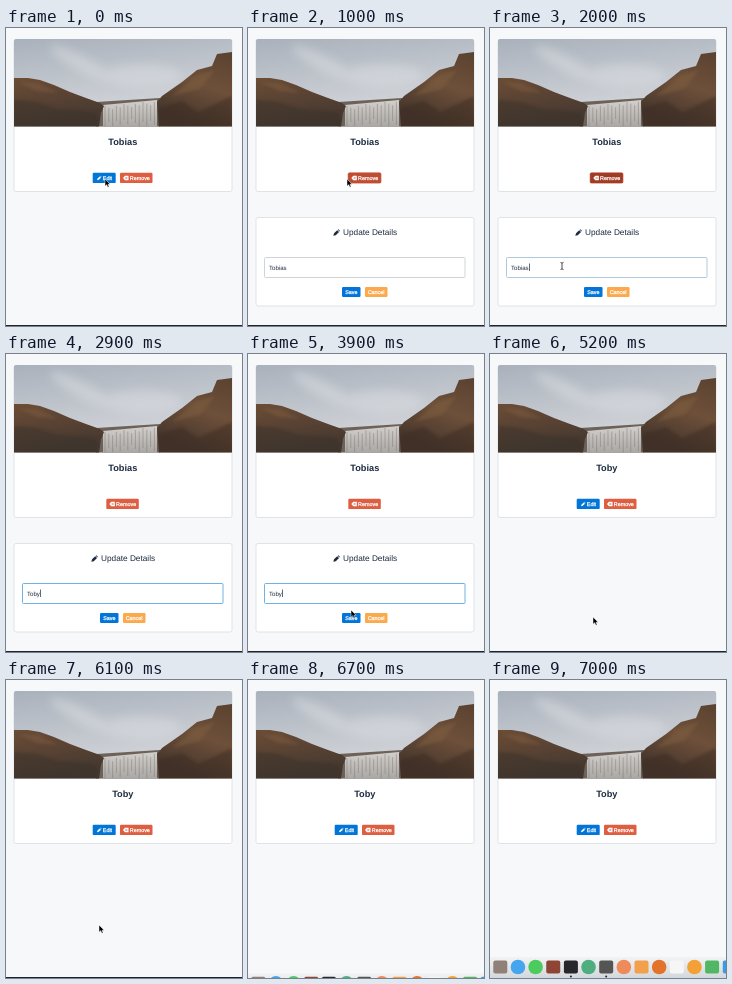
Write an HTML page that moves like this. It is 236 px wide and 298 px high and loops after 7.1 s.

```html
<!DOCTYPE html>
<html lang="en">
<head>
<meta charset="utf-8">
<title>Edit details</title>
<style>
  html, body { margin: 0; width: 100%; height: 100%; overflow: hidden; background: #f6f8fa; }
  svg { display: block; width: 100%; height: 100%; }
  text { font-family: "Liberation Sans", Arial, sans-serif; fill: #1c2b3f; text-rendering: geometricPrecision; }
  .label { font-size: 5.4px; fill: #fff; stroke: #fff; stroke-width: .25; }
  .card { fill: #fff; stroke: #dfe3e8; }
</style>
</head>
<body>
<svg viewBox="0 0 236 298">
  <defs>
    <linearGradient id="sky" x2=".3" y2="1">
      <stop stop-color="#a9b1bc"/><stop offset=".8" stop-color="#ced1d6"/>
    </linearGradient>
    <linearGradient id="left" x2=".3" y2="1">
      <stop stop-color="#6b4d36"/><stop offset=".5" stop-color="#584233"/><stop offset="1" stop-color="#443830"/>
    </linearGradient>
    <linearGradient id="right" x1="1" x2=".6" y2="1">
      <stop stop-color="#5a4230"/><stop offset=".5" stop-color="#6e503a"/><stop offset="1" stop-color="#46362c"/>
    </linearGradient>
    <linearGradient id="water" x2="0" y2="1">
      <stop stop-color="#d2d0cd"/><stop offset="1" stop-color="#a9a6a3"/>
    </linearGradient>
    <linearGradient id="shelf" x2="0" y2="1">
      <stop stop-color="#f1f3f5"/><stop offset="1" stop-color="#d3d6da"/>
    </linearGradient>
    <filter id="soft" x="-50%" y="-50%" width="200%" height="200%"><feGaussianBlur stdDeviation="5"/></filter>
    <filter id="blur"><feGaussianBlur stdDeviation="1.5"/></filter>
    <clipPath id="photo"><path d="M8 98.6V13q0-2 2-2H224q2 0 2 2V98.6z"/></clipPath>
    <path id="pencil" d="M0 6L.7 3.7 3.6.8 5.3 2.5 2.3 5.4zM4.1.4L4.7-.1 6.1 1.3 5.7 2z"/>
  </defs>

  <rect width="236" height="298" fill="#f6f8fa"/>
  <rect y="297" width="236" height="1" fill="#20242a"/>

  <rect class="card" x="8" y="11.5" width="218" height="152" rx="2"/>
  <g clip-path="url(#photo)">
    <rect x="8" y="11" width="218" height="88" fill="url(#sky)"/>
    <g fill="#dadde1" opacity=".5" filter="url(#soft)">
      <ellipse cx="76" cy="36" rx="36" ry="8" transform="rotate(28 76 36)"/>
      <ellipse cx="136" cy="48" rx="40" ry="12"/>
    </g>
    <path d="M90 99V74L154 70V99z" fill="#6d6259"/>
    <path d="M97 99V77L151 72V99z" fill="url(#water)"/>
    <path id="falls" fill="none" stroke="#7d736b" stroke-width="1" opacity=".45"/>
    <path d="M8 50L22 50 34 52 48 57 64 64 80 70 94 75 98 78 95 85 93 99H8z" fill="url(#left)"/>
    <path d="M226 24L211 26 206 38 191 42 176 54 156 68 151 74 153 99H226z" fill="url(#right)"/>
    <g filter="url(#blur)" opacity=".5">
      <path d="M8 72L30 74 52 81 90 84 92 99H8z" fill="#3a302a"/>
      <path d="M12 54L32 55 52 65 30 63z" fill="#7f5b3f"/>
      <path d="M153 80L176 73 192 84 226 68V99H153z" fill="#3a2c24"/>
      <path d="M166 68L191 47 209 42 194 61z" fill="#80603f"/>
    </g>
  </g>
  <text id="title" x="116.8" y="116.5" font-size="9.2" font-weight="700" text-anchor="middle"></text>

  <g id="edit">
    <rect x="86.7" y="144.7" width="23" height="10.4" rx="1.2" fill="#0275d8"/>
    <use href="#pencil" transform="translate(91 147.8) scale(.75)" fill="#fff"/>
    <text class="label" x="96.8" y="151.8">Edit</text>
  </g>
  <g id="remove">
    <rect id="ring" x="113.4" y="144.4" width="33.7" height="11.2" rx="1.8" fill="#c9735c"/>
    <rect id="removeBox" x="114" y="144.8" width="32.5" height="10.3" rx="1.2"/>
    <path d="M117 150L119 147.8H122.5V152.2H119z" fill="#fff"/>
    <path d="M119.3 149L121.3 151M121.3 149L119.3 151" stroke="#d9694e" stroke-width=".6"/>
    <text class="label" x="123.8" y="151.8">Remove</text>
  </g>

  <g id="panel">
    <rect class="card" x="8" y="189.5" width="218" height="88.5" rx="2"/>
    <use href="#pencil" transform="translate(85.3 201.3) scale(1.08)" fill="#1c2b3f"/>
    <text x="95" y="207.3" font-size="8.25">Update Details</text>
    <rect id="field" x="16.5" y="229.5" width="200.5" height="20" rx="1" fill="#fff"/>
    <text id="value" x="21" y="241.5" font-size="6.1"></text>
    <rect id="caret" y="235.5" width=".7" height="7.5" fill="#1c2b3f"/>
    <rect x="94" y="259" width="18.5" height="10" rx="1.2" fill="#0275d8"/>
    <text class="label" x="97.2" y="265.9">Save</text>
    <rect x="117" y="259" width="22.5" height="10" rx="1.2" fill="#fba94c"/>
    <text class="label" x="119.7" y="265.9">Cancel</text>
  </g>

  <g id="dock"><rect y="277" width="236" height="22" fill="url(#shelf)"/></g>

  <path id="arrow" d="M0 0V7.2L1.7 5.7 2.9 8.3 4.1 7.8 3 5.2H5.2z" stroke="#fff" stroke-width=".5"/>
  <path id="beam" d="M-1.5-3.5Q0-3.5 0-2.5Q0-3.5 1.5-3.5M0-2.5V2.5M-1.5 3.5Q0 3.5 0 2.5Q0 3.5 1.5 3.5" fill="none" stroke="#222" stroke-width=".8"/>
</svg>
<script>
const LOOP = 7100, STEP = 100;
const OPEN = 900, FOCUS = 2000, SAVE = 4500, DOCK = 6600;
const OLD = "Tobias", NEW = "Toby";
const edits = [[2400, "Tobia"], [2500, "Tobi"], [2600, "Tob"], [2800, NEW]];
const pointer = [[0, 99, 151], [1100, 99, 151], [1800, 72, 238], [3200, 72, 238], [3900, 103, 256],
  [4200, 103, 263], [5600, 103, 263], [6100, 93, 245], [6400, -8, 262]];
const icons = ["#8f8078", "#45a5ee", "#4ccb5f", "#8f4535", "#26282b", "#4fae7f", "#555553",
  "#ef8a5a", "#f2a04c", "#e2732b", "#f6f6f7", "#f3a137", "#52b765", "#3d9be0"];
const squares = [0, 3, 4, 6, 8, 10, 12, 13];

const $ = id => document.getElementById(id);
const set = (id, attrs) => { for (const k in attrs) $(id).setAttribute(k, attrs[k]); };
const show = (id, on) => set(id, { visibility: on ? "visible" : "hidden" });
const ramp = (t, from, to) => Math.min(1, Math.max(0, (t - from) / (to - from)));
const ease = p => p * p * (3 - 2 * p);
const mix = (a, b, p) => `rgb(${a.map((v, i) => Math.round(v + (b[i] - v) * p))})`;

function addShape(tag, attrs) {
  const el = document.createElementNS("http://www.w3.org/2000/svg", tag);
  for (const k in attrs) el.setAttribute(k, attrs[k]);
  $("dock").append(el);
}

icons.forEach((fill, i) => {
  const x = 10.3 + 17.65 * i, y = 287;
  if (squares.includes(i)) addShape("rect", { x: x - 7, y: y - 6.5, width: 14, height: 13, rx: 2, fill });
  else addShape("circle", { cx: x, cy: y, r: 7.3, fill });
  if (i === 4 || i === 6) addShape("circle", { cx: x, cy: 296.6, r: 1, fill: "#222" });
});

let streaks = "";
for (let i = 0; i < 14; i++) streaks += `M${99 + i * 3.8} ${78 - i * .4 + i * 7 % 5}V${99 - i * 5 % 9}`;
set("falls", { d: streaks });

function pointerAt(t) {
  const i = pointer.findIndex(k => k[0] > t);
  if (i < 0) return pointer.at(-1).slice(1);
  const [a, b] = [pointer[i - 1], pointer[i]], p = ease(ramp(t, a[0], b[0]));
  return [a[1] + (b[1] - a[1]) * p, a[2] + (b[2] - a[2]) * p];
}

function draw(t) {
  const open = t >= OPEN && t < SAVE;
  $("title").textContent = t < SAVE ? OLD : NEW;
  $("edit").style.display = open ? "none" : "";
  $("panel").style.display = open ? "" : "none";

  const dark = open ? ramp(t, OPEN - 100, OPEN + 300) * (1 - ramp(t, FOCUS, FOCUS + 200)) : 0;
  set("remove", { transform: `translate(${open ? -13.7 : 0} 0)` });
  set("removeBox", { fill: mix([222, 94, 66], [160, 60, 36], dark) });
  set("ring", { opacity: Math.min(1, dark * 2) });

  const done = edits.filter(e => e[0] <= t).at(-1) || [FOCUS, OLD];
  $("value").textContent = done[1];
  set("field", { stroke: mix([208, 212, 217], [112, 178, 228], ramp(t, FOCUS - 100, FOCUS + 200)) });
  if (open) set("caret", { x: 21.4 + $("value").getComputedTextLength() });
  $("caret").style.display = t >= FOCUS && (t - done[0]) % 1000 < 500 ? "" : "none";

  const [x, y] = pointerAt(t), typing = t >= 2400 && t < 3200;
  const overField = open && y > 229 && y < 249;
  for (const id of ["arrow", "beam"]) set(id, { transform: `translate(${x} ${y})` });
  show("arrow", !typing && !overField);
  show("beam", !typing && overField);

  set("dock", { transform: `translate(0 ${22 * (1 - ease(ramp(t, DOCK, DOCK + 300)))})` });
}

const start = performance.now();
function tick() {
  const t = (performance.now() - start) % LOOP;
  draw(Math.floor(t / STEP) * STEP);
  requestAnimationFrame(tick);
}
tick();
</script>
</body>
</html>
```
